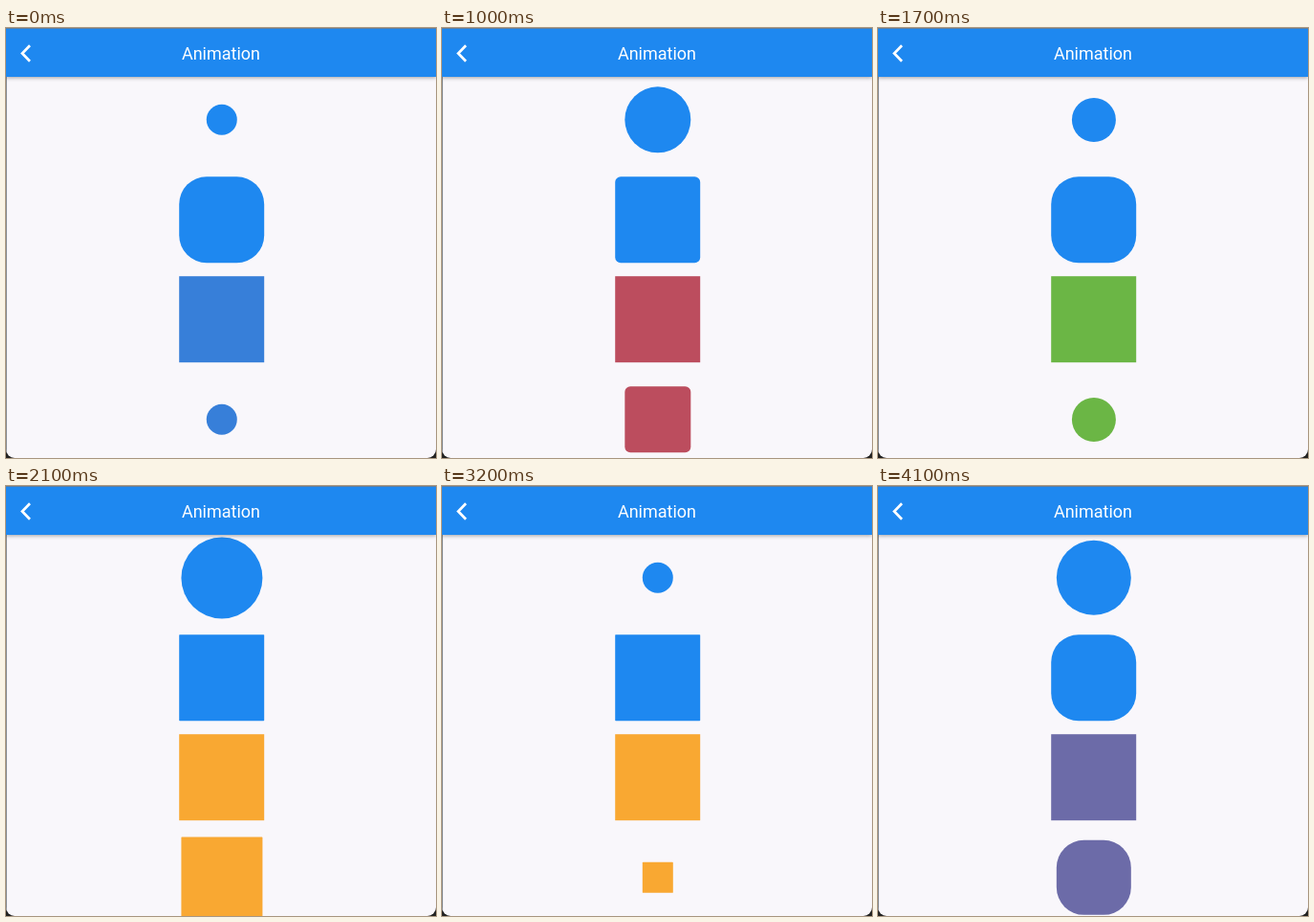
An HTML page that plays this animation: 450 px wide and 449 px high, repeating every 4.2 s.

```html
<!DOCTYPE html>
<html lang="en">
<head>
<meta charset="utf-8">
<title>Animation</title>
<style>
  html, body { margin: 0; width: 100%; height: 100%; overflow: hidden; background: #222; }
  #stage { position: relative; width: 450px; height: 449px; overflow: hidden; }
  #page { position: absolute; inset: 0; background: #f9f7fb; border-radius: 0 0 9px 9px; overflow: hidden; }
  #page::after { content: ""; position: absolute; left: 0; top: 0; width: 1px; height: 100%; background: #8b9199; }
  .shape { position: absolute; left: 225.5px; transform: translate(-50%, -50%); background: #1e88f0; }
  header {
    position: absolute; left: 0; top: 0; width: 450px; height: 51px; z-index: 1;
    background: #1e88f0; box-shadow: 0 1px 4px rgba(0, 0, 0, .35);
  }
  header::before { content: ""; position: absolute; left: 0; top: 0; width: 100%; height: 1px; background: #5f7f9f; }
  header svg { position: absolute; left: 0; top: 0; }
  text { font: 18px Roboto, sans-serif; fill: #fff; text-anchor: middle; }
</style>
</head>
<body>
<div id="stage">
  <div id="page">
    <header>
      <svg width="450" height="51">
        <path d="M25 18.2 L17 26.5 L25 34.8" fill="none" stroke="#fff" stroke-width="2.7"/>
        <text x="225" y="33">Animation</text>
      </svg>
    </header>
  </div>
</div>
<script>
const LOOP = 4200, STEP = 100, START = 3350;
const MAX_SIZE = 89.6, MIN_SIZE = 9, MAX_RADIUS = 44.8;
const COLORS = [[240, 58, 46], [30, 136, 240], [76, 171, 72], [255, 233, 53], [240, 58, 46]];

const page = document.getElementById('page');
const [sizeBox, radiusBox, colorBox, comboBox] = [96, 200.2, 304.4, 408.6].map(y => {
  const box = document.createElement('div');
  box.className = 'shape';
  box.style.top = y + 'px';
  page.append(box);
  return box;
});

const mix = (a, b, k) => a + (b - a) * k;

// Cubic Bézier easing with control points (x1, 0) and (x2, 1)
const bezier = (x1, x2) => x => {
  let low = 0, high = 1;
  for (let i = 0; i < 24; i++) {
    const s = (low + high) / 2, r = 1 - s;
    if (3 * x1 * s * r * r + 3 * x2 * s * s * r + s ** 3 < x) low = s;
    else high = s;
  }
  return 3 * low * low - 2 * low ** 3;
};
const easeOut = bezier(0, 0.58);
const easeInOut = bezier(0.42, 0.58);

// Runs 0 → 1 → 0, each way taking the given duration
const pingPong = (time, duration) => 1 - Math.abs(time / duration % 2 - 1);

function colorAt(u) {
  const scaled = u * (COLORS.length - 1);
  const i = Math.min(Math.floor(scaled), COLORS.length - 2);
  const rgb = COLORS[i].map((c, n) => Math.round(mix(c, COLORS[i + 1][n], scaled - i)));
  return `rgb(${rgb})`;
}

function paint(box, size, radius, color) {
  box.style.width = box.style.height = size + 'px';
  box.style.borderRadius = radius + 'px';
  if (color) box.style.background = color;
}

function draw(now) {
  const time = START + Math.floor(now % LOOP / STEP) * STEP;
  const size = mix(MIN_SIZE, MAX_SIZE, easeOut(pingPong(time, 800)));
  const radius = mix(MAX_RADIUS, 0, easeInOut(pingPong(time, 600)));
  const color = colorAt(easeInOut(pingPong(time, 2000)));
  paint(sizeBox, size, size / 2);
  paint(radiusBox, MAX_SIZE, radius);
  paint(colorBox, MAX_SIZE, 0, color);
  paint(comboBox, size, radius, color);
}

const begin = performance.now();
function tick() {
  draw(performance.now() - begin);
  requestAnimationFrame(tick);
}
tick();
</script>
</body>
</html>
```
